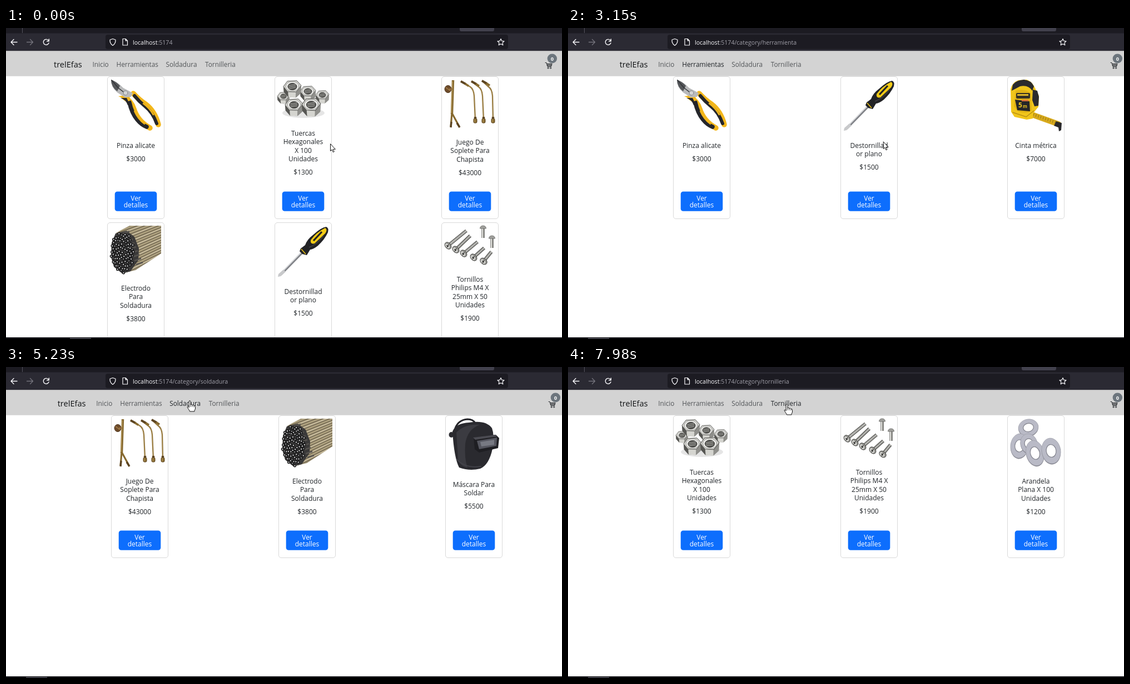
Recreate the animation shown at these times as an HTML page with a canvas. Size 1000 by 560 pixels, loop 8 s.

```html
<!DOCTYPE html>
<html lang="es">
<head>
<meta charset="utf-8">
<title>Tienda</title>
<style>
html, body { margin: 0; width: 100%; height: 100%; overflow: hidden; background: #fff; }
canvas { display: block; width: 1000px; height: 560px; }
</style>
</head>
<body>
<canvas id="stage" width="1000" height="560"></canvas>
<script>
const c = document.getElementById('stage').getContext('2d');
const LOOP = 8000;
const SANS = '"Open Sans", "Noto Sans", sans-serif';

// ---------- helpers ----------
function rect(x, y, w, h, fill, r = 0, line) {
  c.beginPath();
  c.roundRect(x, y, w, h, r);
  if (fill) { c.fillStyle = fill; c.fill(); }
  if (line) { c.strokeStyle = line; c.lineWidth = 1; c.stroke(); }
}

function shape(d, fill, line, width = 1) {
  const path = new Path2D(d);
  if (fill) { c.fillStyle = fill; c.fill(path); }
  if (line) { c.strokeStyle = line; c.lineWidth = width; c.stroke(path); }
}

const stroke = (d, color, width) => shape(d, null, color, width);

function oval(x, y, rx, ry, fill, line, width = 1, turn = 0) {
  c.beginPath();
  c.ellipse(x, y, rx, ry, turn, 0, Math.PI * 2);
  if (fill) { c.fillStyle = fill; c.fill(); }
  if (line) { c.strokeStyle = line; c.lineWidth = width; c.stroke(); }
}

function text(s, x, y, size, color, align = 'left', weight = 400) {
  c.font = `${weight} ${size}px ${SANS}`;
  c.textAlign = align;
  c.fillStyle = color;
  c.fillText(s, x, y);
  return c.measureText(s).width;
}

function at(x, y, draw) {
  c.save();
  c.translate(x, y);
  draw();
  c.restore();
}

function random(seed) {
  return () => (seed = (seed * 16807) % 2147483647) / 2147483647;
}

// ---------- product pictures, about 91 x 92 ----------
function pliers() {
  c.lineCap = 'round';
  stroke('M41 25Q52 37 63 44Q80 57 86 81', '#f3b71b', 9.5);
  stroke('M43 29Q52 40 62 48Q76 59 83 79', '#25262a', 6);
  stroke('M59 43Q70 51 77 63', '#f3b71b', 2.6);
  stroke('M25 32Q37 38 42 53Q49 75 71 87', '#f3b71b', 9.5);
  stroke('M34 41Q38 60 48 72Q55 81 65 85', '#25262a', 7.5);
  stroke('M43 57Q49 71 61 80', '#f3b71b', 2);
  shape('M14 30L34 27L35 38L28 40Q23 33 14 30Z', '#f3b71b');
  shape('M18 33L29 33L35 45L31 46Q28 36 18 33Z', '#25262a');
  shape('M1 0Q14 5 23 15L40 24L37 31L26 32L12 23Q1 14 1 0Z', '#b9babb');
  shape('M1 0Q11 4 17 11L12 21Q1 13 1 0Z', '#55575a');
  stroke('M2 1L14 15L27 25', '#303236', 1.4);
  oval(27, 24, 4, 4, '#d3d4d5', '#85878a');
}

function nut(x, y, r) {
  at(x, y, () => {
    c.scale(r, r);
    shape('M-1 -.3L-.95 .35L-.45 .92L.4 .95L.95 .45L1 -.4Z', '#83837f');
    shape('M-1 -.25L-.95 .35L-.45 .92L-.5 .3Z', '#565653');
    shape('M-.48 .3L-.43 .92L.38 .95L.4 .33Z', '#d5d5d0');
    shape('M.42 .33L.42 .93L.95 .45L.98 -.3Z', '#8f8f8b');
    shape('M-1 -.3L-.55 -.9L.5 -.95L1 -.4L.42 .33L-.5 .3Z', '#cfcfcb', '#5a5a57', .06);
    oval(0, -.3, .72, .54, '#f6f6f3', '#8c8c88', .05);
    oval(0, -.28, .54, .42, '#4d4d4a');
    for (let i = 0; i < 3; i++) stroke(`M-.4 ${-.4 + i * .17}L.36 ${-.52 + i * .17}`, '#bdbdb8', .06);
  });
}

function nuts() {
  oval(46, 60, 38, 9, 'rgba(0,0,0,.1)');
  nut(80, 31, 12);
  nut(10, 33, 11);
  nut(54, 25, 14);
  nut(26, 17, 16);
  nut(29, 50, 16);
  nut(60, 50, 17);
}

function torches() {
  const gold = '#86692f', dark = '#5c4421', light = '#bda163';
  c.lineCap = 'butt';
  stroke('M15 1L13 62', gold, 4.4);
  stroke('M14 3L12 60', light, 1.2);
  stroke('M13 60L11 85M14 62L26 84', gold, 3.2);
  stroke('M12 76L11 86M22 78L27 86', dark, 3.4);
  oval(6, 17, 6, 6.5, '#6d4b2a', '#4c321a');
  stroke('M2 14L10 20M8 17L14 17', '#9a7442', 2);
  for (const [x, y, bx, ex] of [[29, 3, 50, 55], [48, 3, 65, 70], [67, 2, 83, 87]]) {
    const tube = `M${x} ${y}L${bx - 4} 13Q${bx + 2} 17 ${bx + 3} 29L${ex} 72`;
    stroke(tube, gold, 2.3);
    stroke(tube, light, .7);
    stroke(`M${x} ${y}l9 5`, dark, 3.8);
    stroke(`M${x + 8} ${y + 4.5}l6 4`, gold, 3.8);
    rect(ex - 2.2, 67, 4.4, 3, dark);
    rect(ex - 3, 70, 6, 8, gold, 2, dark);
    stroke(`M${ex - .8} 71v6`, light, 1);
  }
}

function rods() {
  const rnd = random(41);
  c.lineCap = 'butt';
  c.save();
  c.clip(new Path2D('M10 13L34 0L91 0L91 50L45 80L20 86Z'));
  rect(0, 0, 92, 90, '#968a6d');
  for (let i = 0; i < 16; i++) {
    const y = 10 + i * 5.3, end = i * 4.6 - 18;
    stroke(`M15 ${y}L92 ${end}`, i % 2 ? '#c3b798' : '#aea17f', 2.8);
    stroke(`M15 ${y + 2}L92 ${end + 2}`, '#5d5340', 1);
  }
  c.restore();
  shape('M9 14L29 9L43 20L51 41L50 62L36 82L21 86L6 74L1 56L2 31Z', '#3a3939');
  for (let i = 0; i < 9; i++) stroke(`M${22 + i * 3} ${14 + i * 7}l12 -4`, '#55524e', 2.4);
  for (let i = 0; i < 90; i++) {
    const a = i * 2.4, r = Math.sqrt(i / 90) + rnd() * .08;
    const x = 21 + Math.cos(a) * r * 20, y = 48 + Math.sin(a) * r * 35;
    oval(x, y, 1.9, 2, rnd() < .25 ? '#8d8d8e' : '#d0d0d1', '#161617', 1.5);
  }
}

function driver() {
  c.lineCap = 'butt';
  stroke('M46 46L5 88', '#818388', 4.2);
  stroke('M45 45L5 86', '#dcdee1', 1.7);
  shape('M10 79L14 83L5 91L0 92L1 87Z', '#c8c9cb');
  shape('M49 35Q52 25 64 16Q78 3 87 2Q92 4 90 12Q84 25 72 36Q63 43 58 43L52 53L44 51L39 46L41 41Z', '#222326');
  shape('M59 26Q69 12 85 4Q90 7 85 14L66 32Q58 34 59 26Z', '#f2cb16');
  stroke('M64 27L79 11', '#222326', 3.2);
  stroke('M42 42L50 51', '#e9bf15', 1.6);
  stroke('M56 39Q70 34 82 18', '#494a4e', 1.2);
}

function screw(x, y, ex, ey, r) {
  const a = Math.atan2(ey - y, ex - x), d = `M${x} ${y}L${ex} ${ey}`;
  c.lineCap = 'butt';
  stroke(d, '#5b5b58', r);
  stroke(d, '#dcdcd8', r * .5);
  c.setLineDash([.9, 1.5]);
  stroke(d, '#6f6f6b', r * .9);
  c.setLineDash([]);
  oval(x, y, r * .85, r * 1.15, '#8e8e8a', '#4a4a47', 1, a);
  oval(x - 1, y + .5, r * .5, r * .8, '#dededa', null, 0, a);
  stroke(`M${x - 3} ${y - 1}l4 3M${x + 1} ${y - 2}l-3 5`, '#343432', 1.5);
}

function screws() {
  [[6, 36, 39, 9], [20, 43, 46, 18], [34, 50, 59, 29], [52, 57, 71, 40], [70, 64, 84, 47]]
    .forEach(s => screw(...s, 6));
  for (const [x, y] of [[69, 0], [85, 18]]) {
    stroke(`M${x} ${y + 3}V${y + 22}`, '#73736f', 5.6);
    stroke(`M${x - .8} ${y + 3}V${y + 22}`, '#dededa', 2.4);
    shape(`M${x - 5.5} ${y + 5}Q${x - 5} ${y} ${x} ${y}T${x + 5.5} ${y + 5}Z`, '#a2a29e', '#60605d', .8);
  }
}

function tape() {
  stroke('M36 62L86 80', '#d8aa1b', 10);
  for (let i = 0; i < 10; i++) stroke(`M${42 + i * 4.3} ${61 + i * 1.55}l-1 4`, '#7b651d', .8);
  shape('M82 75L92 78L91 91L87 93L86 86L78 83Z', '#29292b');
  shape('M0 17Q3 5 14 1L29 0Q38 3 43 13L51 29L50 49L41 60L40 70L29 72L7 67L1 58Z', '#f0c51b');
  shape('M4 9Q10 1 24 0Q37 1 42 12L39 20Q32 9 17 12L2 20Z', '#2a2a2d');
  shape('M40 18L48 20L51 31L50 47L43 48L39 37Z', '#2a2a2d');
  shape('M9 20Q25 15 37 25L38 55Q29 63 13 57L6 48Z', '#e1b415');
  rect(10, 24, 25, 10, '#353124', 2);
  rect(12, 26, 20, 3, '#dfb82a');
  shape('M8 36L34 39L35 57L12 55Z', '#262628');
  text('5', 14, 50, 12, '#f2c81e', 'left', 700);
  text('m', 22, 51, 8, '#f2c81e', 'left', 700);
  rect(20, 36, 12, 3, '#d9743a');
  stroke('M4 59L28 67L42 56', '#b99012', 1.5);
}

function mask() {
  c.lineCap = 'round';
  stroke('M12 17Q18 2 34 1Q44 1 48 8', '#242429', 3);
  oval(5, 29, 4.5, 5, '#2c2c31');
  shape('M7 23Q13 8 37 7Q67 2 78 17Q83 30 79 54Q73 83 57 90Q38 95 19 88Q10 71 7 23Z', '#2a2a2f');
  shape('M14 25Q29 9 56 11Q34 19 30 45Q28 71 34 88Q20 86 17 72Z', '#3b3b41');
  stroke('M14 72Q28 90 58 86', '#45454c', 1.3);
  shape('M45 34L85 29L91 35L89 53L55 61L47 55Z', '#1e1e22');
  shape('M51 40L87 34L86 49L55 55Z', '#55565f');
  shape('M57 42L82 38L82 47L59 50Z', '#777982');
  shape('M44 34L85 29L88 32L48 38Z', '#4b4b52');
}

function washer(x, y, rx, ry, turn) {
  oval(x, y + 1.5, rx, ry, '#85858f', null, 0, turn);
  oval(x, y, rx, ry, '#b9bac6', '#9b9ca7', .7, turn);
  oval(x, y, rx * .52, ry * .5, '#fff', '#83848e', 1.2, turn);
}

function washers() {
  washer(32, 16, 18, 15, -.2);
  washer(16, 49, 16, 22, .1);
  washer(33, 45, 15, 18, -.3);
  washer(44, 62, 16, 23, -.25);
  washer(73, 58, 17, 23, -.15);
}

// ---------- shop ----------
const items = {
  pliers: [['Pinza alicate'], 3000, 129, pliers],
  nuts: [['Tuercas', 'Hexagonales', 'X 100', 'Unidades'], 1300, 107, nuts],
  torches: [['Juego De', 'Soplete Para', 'Chapista'], 43000, 123, torches],
  rods: [['Electrodo', 'Para', 'Soldadura'], 3800, 123, rods],
  driver: [['Destornillad', 'or plano'], 1500, 129, driver],
  screws: [['Tornillos', 'Philips M4 X', '25mm X 50', 'Unidades'], 1900, 107, screws],
  tape: [['Cinta métrica'], 7000, 129, tape],
  mask: [['Máscara Para', 'Soldar'], 5500, 129, mask],
  washers: [['Arandela', 'Plana X 100', 'Unidades'], 1200, 123, washers]
};

const pages = [
  { from: 0, path: '', show: ['pliers', 'nuts', 'torches', 'rods', 'driver', 'screws'] },
  { from: 1910, path: '/category/herramienta', show: ['pliers', 'driver', 'tape'] },
  { from: 5020, path: '/category/soldadura', show: ['torches', 'rods', 'mask'] },
  { from: 7770, path: '/category/tornilleria', show: ['nuts', 'screws', 'washers'] }
];
const links = [['Inicio', 155.5, 30], ['Herramientas', 198.5, 75], ['Soldadura', 287.5, 57], ['Tornilleria', 358, 55]];
const clicks = [[1770, 1980], [4880, 5090], [7630, 7840]];
const tips = [[1770, 2050, 1], [4540, 5160, 2], [7290, 7910, 3]];

// Pointer path: time, x, y
const track = [
  [0, 583, 209], [70, 582.5, 209], [320, 583, 212], [460, 572, 262], [740, 400, 110], [900, 290, 18],
  [1030, 264, 46], [1100, 257, 65], [1170, 254, 68], [1310, 251, 67], [1390, 250, 67],
  [2510, 250, 67], [2650, 290, 90], [2900, 410, 155], [3150, 566, 205], [3360, 714, 230],
  [3580, 846, 231], [3710, 690, 140], [3850, 400, 60], [3990, 271, 47], [4130, 358, 66],
  [4260, 361, 65], [4400, 345, 62], [4610, 331, 61],
  [5300, 331, 61], [5510, 400, 92], [5720, 533, 109], [5850, 465, 96], [5920, 407, 75],
  [6010, 407, 75], [6210, 435, 88], [6560, 787, 176], [6830, 460, 78], [6950, 397, 68], [7090, 394, 67]
];

function pointer(t) {
  const i = track.findIndex(k => k[0] > t);
  if (i < 0) return track[track.length - 1].slice(1);
  const [a, x, y] = track[Math.max(0, i - 1)], [b, u, v] = track[i];
  const f = (t - a) / (b - a);
  return [x + (u - x) * f, y + (v - y) * f];
}

const pageAt = t => pages.findLastIndex(p => t >= p.from);
const shiftAt = t => pageAt(t) ? 6.7 : 0;

function hovered(t) {
  const [x, y] = pointer(t), dx = shiftAt(t);
  return links.findIndex(l => x > l[1] + dx - 6 && x < l[1] + dx + l[2] + 6 && y > 49 && y < 82);
}

// Share of the last 150 ms spent over a link, for the colour fade
function hoverLevel(t, link) {
  let n = 0;
  for (let i = 0; i < 6; i++) if (hovered(Math.max(0, t - i * 25)) === link) n++;
  return n / 6;
}

// ---------- scene ----------
function browser(path) {
  rect(0, 0, 1000, 10, '#1c1b22');
  rect(816, -4, 62, 10, '#42414d', 3);
  rect(29, 0, 1, 9, '#55545e');
  rect(0, 9.5, 1000, 32, '#2b2a33');
  rect(179, 12, 724, 26, '#1c1b22', 4);
  c.lineCap = c.lineJoin = 'round';
  stroke('M20 25.5H9M14 20.5L9 25.5L14 30.5', '#fbfbfe', 1.3);
  stroke('M37.5 25.5H48.5M43.5 20.5L48.5 25.5L43.5 30.5', '#74737c', 1.3);
  stroke('M76 22A5 5 0 1 0 77 27M77.3 20V23.7H73.6', '#fbfbfe', 1.4);
  stroke('M192 19.5L197 21.3Q197.5 28 192 31.5Q186.5 28 187 21.3Z', '#fbfbfe', 1.2);
  stroke('M210 19.5H215L218.5 23V31H210ZM215 19.5V23H218.5', '#fbfbfe', 1.2);
  stroke('M890 19.5L891.8 23.3L896 23.8L893 26.6L893.8 30.8L890 28.7L886.2 30.8L887 26.6L884 23.8L888.2 23.3Z', '#fbfbfe', 1.2);
  const w = text('localhost', 228, 30, 10.6, '#fbfbfe');
  text(':5174' + path, 228 + w, 30, 10.6, '#a09fa8');
  c.lineJoin = 'miter';
}

function navbar(t, page, dx) {
  rect(0, 41.5, 1000, 45.2, '#d3d3d3');
  text('trelEfas', 86 + dx, 71, 14.6, '#111315');
  links.forEach(([label, x], i) => {
    const alpha = i && i === page ? 1 : .72 + .2 * hoverLevel(t, i);
    text(label, x + dx, 70, 11.8, `rgba(33,37,41,${alpha})`);
  });
  at(970 + dx * .9, 61, () => {
    stroke('M0 1.5H2L4 8.5H10.5L12 3.5H2.6M3 6H11', '#212529', 1);
    stroke('M5 3.5V8M7.3 3.5V8M9.6 3.5V8', '#212529', .7);
    oval(5, 11, 1.1, 1.1, null, '#212529');
    oval(9.6, 11, 1.1, 1.1, null, '#212529');
  });
  oval(982.3 + dx * .9, 55, 8.7, 8.5, '#6c757d');
  text('0', 982.3 + dx * .9, 58.5, 9.2, '#fff', 'center', 700);
}

function card(id, x, y) {
  const [title, price, base, picture] = items[id];
  const mid = 51.5, line = i => base + Math.round(i * 15.4);
  at(Math.round(x), y, () => {
    rect(.5, .5, 102, 256, '#fff', 4.5, '#d9d9d9');
    at(6, 6, picture);
    title.forEach((s, i) => text(s, mid, line(i), 12, '#212529', 'center'));
    text('$' + price, mid, line(title.length - 1) + 24, 12, '#212529', 'center');
    rect(13.7, 207.4, 75.6, 35.4, '#0d6efd', 4.5);
    text('Ver', mid, 224, 12, '#fff', 'center');
    text('detalles', mid, 236, 12, '#fff', 'center');
  });
}

function status(path) {
  const label = 'localhost:5174' + path;
  c.font = `400 9.1px ${SANS}`;
  const w = c.measureText(label).width;
  rect(-4, 541.5, w + 5.5, 16, '#2b2a33', 2, '#4a4953');
  text(label, -2.5, 553, 9.1, '#fbfbfe');
}

function cursor(t) {
  const [x, y] = pointer(t);
  if (clicks.some(k => t >= k[0] && t < k[1])) oval(x, y + 4, 10, 10, 'rgba(238,224,0,.65)');
  c.lineJoin = 'round';
  at(x, y, () => {
    if (hovered(t) >= 0) {
      shape('M-2 1.5Q-2 0 -.5 0Q1 0 1 1.5V7Q3 5.5 4 7.5Q6 6.5 7 8.5Q9.5 8 9.5 10.5V14Q9 16 8 17.5V19H-.5Q-1 17 -3 14.5L-5 11Q-4.5 9 -2 11.5Z', '#fff', '#111');
      stroke('M1 7V10.5M4 8V10.5M7 9V11', '#111', .8);
    } else {
      shape('M.5 0V12.5L3.3 10L5.3 14.6L7.3 13.7L5.3 9.3H9Z', '#fff', '#111');
    }
  });
  c.lineJoin = 'miter';
}

function draw(t) {
  const page = pageAt(t), dx = shiftAt(t), { path, show } = pages[page];
  rect(0, 0, 1000, 560, '#fff');
  show.forEach((id, i) => card(id, 182.2 + dx + (i % 3) * 300.6, 87 + Math.floor(i / 3) * 263));
  browser(path);
  navbar(t, page, dx);
  rect(0, 557, 1000, 3, '#101014');
  rect(page ? 36 : 115, 558, 38, 2, '#45454c');
  const tip = tips.find(s => t >= s[0] && t < s[1]);
  if (tip) status(pages[tip[2]].path);
  cursor(t);
}

const start = performance.now();
function frame() {
  draw((performance.now() - start) % LOOP);
  requestAnimationFrame(frame);
}
frame();
</script>
</body>
</html>
```
